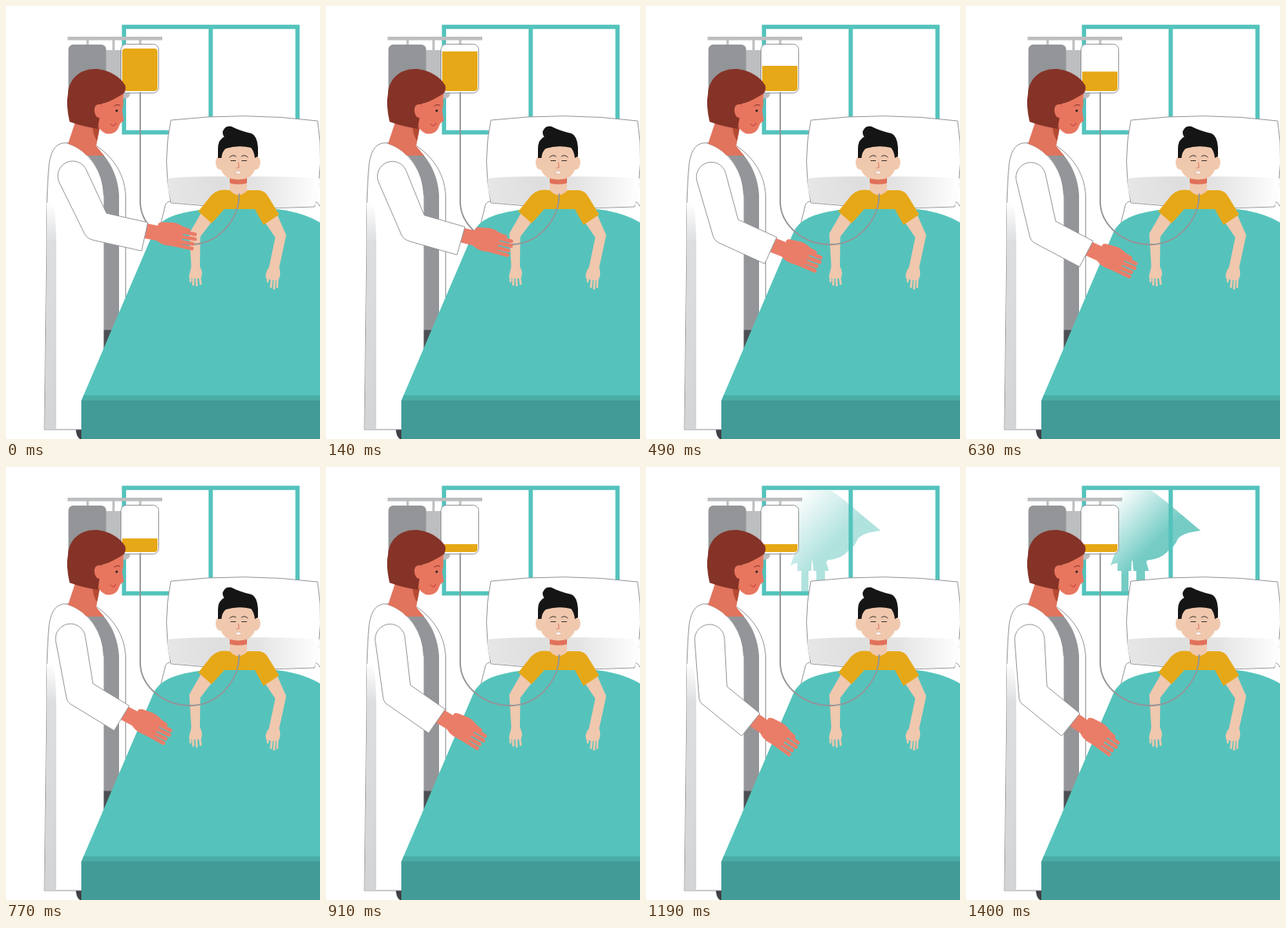
An HTML page for the animation above (3.29 s loop, 400 by 550 pixels).

```html
<!DOCTYPE html>
<html lang="en">
<head>
<meta charset="utf-8">
<title>Bedside</title>
<style>
html, body { margin: 0; height: 100%; overflow: hidden; background: #fff; }
svg { display: block; width: 400px; height: 550px; }
.line { fill: #fff; stroke: #8a8c8f; stroke-width: .9; }
.thin { fill: none; stroke-linecap: round; }
</style>
</head>
<body>
<svg viewBox="0 0 400 550">
  <defs>
    <linearGradient id="capeFill" gradientUnits="userSpaceOnUse" x1="188" y1="40" x2="244" y2="94">
      <stop offset="0" stop-color="#fff"/><stop offset="1" stop-color="#74ccc5"/>
    </linearGradient>
    <linearGradient id="pillowShade">
      <stop offset="0" stop-color="#e6e6e7"/><stop offset=".35" stop-color="#dededf"/>
      <stop offset=".6" stop-color="#e4e4e5"/><stop offset="1" stop-color="#fff"/>
    </linearGradient>
    <linearGradient id="coatShade" x2="0" y2="1">
      <stop offset="0" stop-color="#fff"/><stop offset=".17" stop-color="#dddee0"/>
      <stop offset="1" stop-color="#d3d4d6"/>
    </linearGradient>
    <clipPath id="bagClip"><rect x="148" y="54" width="45" height="54" rx="4"/></clipPath>
  </defs>

  <!-- window -->
  <path id="cape" fill="url(#capeFill)" d="M173 30H236Q241 33 247 38Q259 47 268 55L299 81Q277 83 270 91Q266 101 258 106Q250 116 234 118Q229 118 230 122L233 132H228V158H217V132H213.500L212 119H211L210.500 132H207V158H198V132H193V122Q189 122 184 125L190 108H173Z"/>
  <path fill="none" stroke="#54c3bc" stroke-width="5.4" d="M150.3 26.5H371.3V160.5H150.3ZM260.8 26.5V160.5"/>

  <!-- drip stand -->
  <path stroke="#bcbec0" stroke-width="3" d="M104 42V51M137 42V58M171 42V50"/>
  <path fill="#bcbec0" d="M78.5 39H199V43.5H78.5Z"/>
  <rect x="110" y="56" width="48" height="61.500" rx="6" fill="#bcbec0"/>
  <rect x="79.500" y="49" width="48" height="70" rx="6" fill="#939598"/>
  <rect x="146.500" y="48.500" width="48" height="62" rx="7" class="line"/>
  <rect id="liquid" x="148" width="45" height="60" fill="#e6a817" clip-path="url(#bagClip)"/>

  <!-- doctor -->
  <path fill="#3f4045" d="M89 537H98V550H94Q89 546 89 537Z"/>
  <path class="line" d="M78 174Q59 172 55 200Q51 240 52 300L49 538H152.500V240Q150 202 116 178Z"/>
  <path fill="url(#coatShade)" d="M52 250H60Q64 270 64 300V537.500H49.500L52.300 300Z"/>
  <path fill="#939598" d="M101 187Q123 207 124.500 240V412H144V240Q142 210 124 189Z"/>
  <path fill="#4d4e53" d="M124.500 411.500H144V445H124.500Z"/>
  <path class="thin" stroke="#8a8c8f" stroke-width=".9" d="M78 174Q99 181 112 200Q124 218 124.500 240"/>
  <path fill="#e0745c" d="M89 145L79 175Q92 179 103 190H125L115 178L119 155Z"/>
  <path fill="#b44a33" d="M110 152H120L116 171Q111 165 110 152Z"/>
  <path fill="#e8765f" d="M118 120L150 106Q149 116 149.500 125L148 133L150 146Q145 148 144 153Q141 162 131 162.500Q121 162 116 150Z"/>
  <path fill="#853327" d="M81 147Q76 125 79 111C80 92 95 80 113 80C130 80 146 90 152 101Q153 107 150 111Q131 123 122 124Q120 135 117 156Q97 153 81 147Z"/>
  <path fill="#e8765f" d="M122 125Q113 123 112.500 132Q113 142 120 142Z"/>
  <circle cx="141" cy="133" r="1.500" fill="#222"/>
  <path class="thin" stroke="#853327" d="M138 127Q141 124 145 126"/>
  <path class="thin" stroke="#c8323c" d="M133 150Q138 155 140 149"/>

  <!-- pillow and bed -->
  <path class="line" d="M196 281L203 253Q204 248 212 248H392Q397 248 401 256V300H196Z"/>
  <path class="line" d="M210 145Q304 134 397 146Q406 200 393 255Q304 260 210 250Q199 197 210 145Z"/>
  <path fill="url(#pillowShade)" d="M205.500 219Q235 216 270 216.500H322Q365 216 399.500 219Q398 240 393 254Q304 259 211 249Q206 235 205.500 219Z"/>
  <path fill="#55c3bc" d="M96 501L188 287Q193 276 207 269Q224 261 262 257H335Q375 260 400 275V501Z"/>
  <path fill="#4aada6" d="M99 494.500H400V502H96Z"/>
  <path fill="#429b96" d="M96 501H400V550H96Z"/>

  <!-- boy -->
  <g fill="#f0c8ae">
    <path d="M249 262L233.500 289L236 331L233 344L237 346H248Q252 339 247 331L247.500 293L263 273Z"/>
    <path d="M345 264L357 291L348 332Q351 341 347 348H337L331 345Q330 338 335 332L343 294L330 275Z"/>
    <path d="M285 214H307V240H285Z"/>
  </g>
  <path class="thin" stroke="#f0c8ae" stroke-width="2.600" d="M235 341L235 350M238.500 343V354M242.500 343L243 355M246.500 342L248 353M333 342L333.500 350M339 344L337.500 357M342.500 344L341.500 359M346 343L345.500 357"/>
  <path fill="#e6a817" d="M271 234.500Q277 233 285 234Q296 246 308 234H323Q330 235 334 242L348 265L328 278L317 258H278L262 276L245 261L261 241Q266 236 271 234.500Z"/>
  <path fill="#e0715a" d="M285 217H307V225Q296 228 285 225Z"/>
  <g fill="#f0c8ae">
    <ellipse cx="273" cy="199" rx="6" ry="9"/>
    <ellipse cx="318" cy="199" rx="6" ry="9"/>
    <path d="M273 176H318V202Q317 220 296 220.500Q274 220 273 202Z"/>
  </g>
  <path fill="#151515" d="M270 193V181Q270 170 278 166Q274 161 278 156Q281 152 287 153Q299 159 313 162Q320 165 321 180V191L317 193Q316 184 312 180Q296 176 280 181Q275 185 274.500 193Z"/>
  <path class="thin" stroke="#3d3530" d="M285 192Q289 188 293 191M300 191Q304 188 308 192M286.500 196.500H292.500M300.500 196.500H306.500"/>
  <path class="thin" stroke="#dd7f68" d="M296 199L297 205L294 206"/>
  <path fill="#fff" stroke="#dd9a85" stroke-width=".5" d="M292.500 211Q296 208.500 299.500 211V213H292.500Z"/>

  <path class="thin" stroke="#939598" stroke-width="1.800" d="M171 110V248C171 278 200 303 235 303C270 303 297 272 297 239"/>

  <!-- moving arm -->
  <g id="hand" fill="#ea7d68" stroke-linecap="round">
    <path d="M174 276L195 280Q194 276 200 275.500L214 276Q222 277 229 283L224 304Q210 308 199 303L193 299L172 295Z"/>
    <path stroke="#ea7d68" stroke-width="4.800" d="M213 279L234 286M216 286L242 291M218 293L242 297M216 299L239 303M210 303L238 309"/>
  </g>
  <path id="sleeve" class="line"/>
</svg>
<script>
const STEP = 70, LOOP = 3290, LAST = 20;
const $ = id => document.getElementById(id);
const clamp = v => Math.max(0, Math.min(1, v));
const rad = deg => deg * Math.PI / 180;
const move = ([x, y], deg, dx, dy) => {
  const c = Math.cos(rad(deg)), s = Math.sin(rad(deg));
  return [x + dx * c - dy * s, y + dx * s + dy * c];
};

function drawArm(p) {
  const upper = -25 + 22 * p, fore = 12.5 + 26.5 * p;
  const shoulder = [85 - 4 * p, 216 + 3 * p];
  const at = (x, y) => move(shoulder, upper, x, y);
  const inner = at(19, 61);
  const cuffTop = move(inner, fore, 54, 0);
  const cuffLow = move(cuffTop, fore, 0, 37);
  const bend = move(cuffLow, fore, -62, 0);
  const [x, y] = move(cuffTop, fore, 0, 18.5);
  $('sleeve').setAttribute('d',
    `M${at(-19, 0)}A19 19 0 0 1 ${at(19, 0)}L${inner}L${cuffTop}L${cuffLow}L${bend}` +
    `Q${at(-17, 80)} ${at(-17.3, 73)}Z`);
  $('hand').setAttribute('transform',
    `translate(${x} ${y}) rotate(${23.5 * p}) translate(-178 -294)`);
}

function draw(ms) {
  const k = Math.min(LAST, Math.floor(ms % LOOP / STEP));
  drawArm(clamp(k / 15.5));
  $('liquid').setAttribute('y', 54 + 44 * clamp((k - 1) / 12));
  $('cape').setAttribute('opacity', clamp((k - 13) / 7));
}

let start;
function tick(now) {
  start ??= now;
  draw(now - start);
  requestAnimationFrame(tick);
}
draw(0);
requestAnimationFrame(tick);
</script>
</body>
</html>
```
